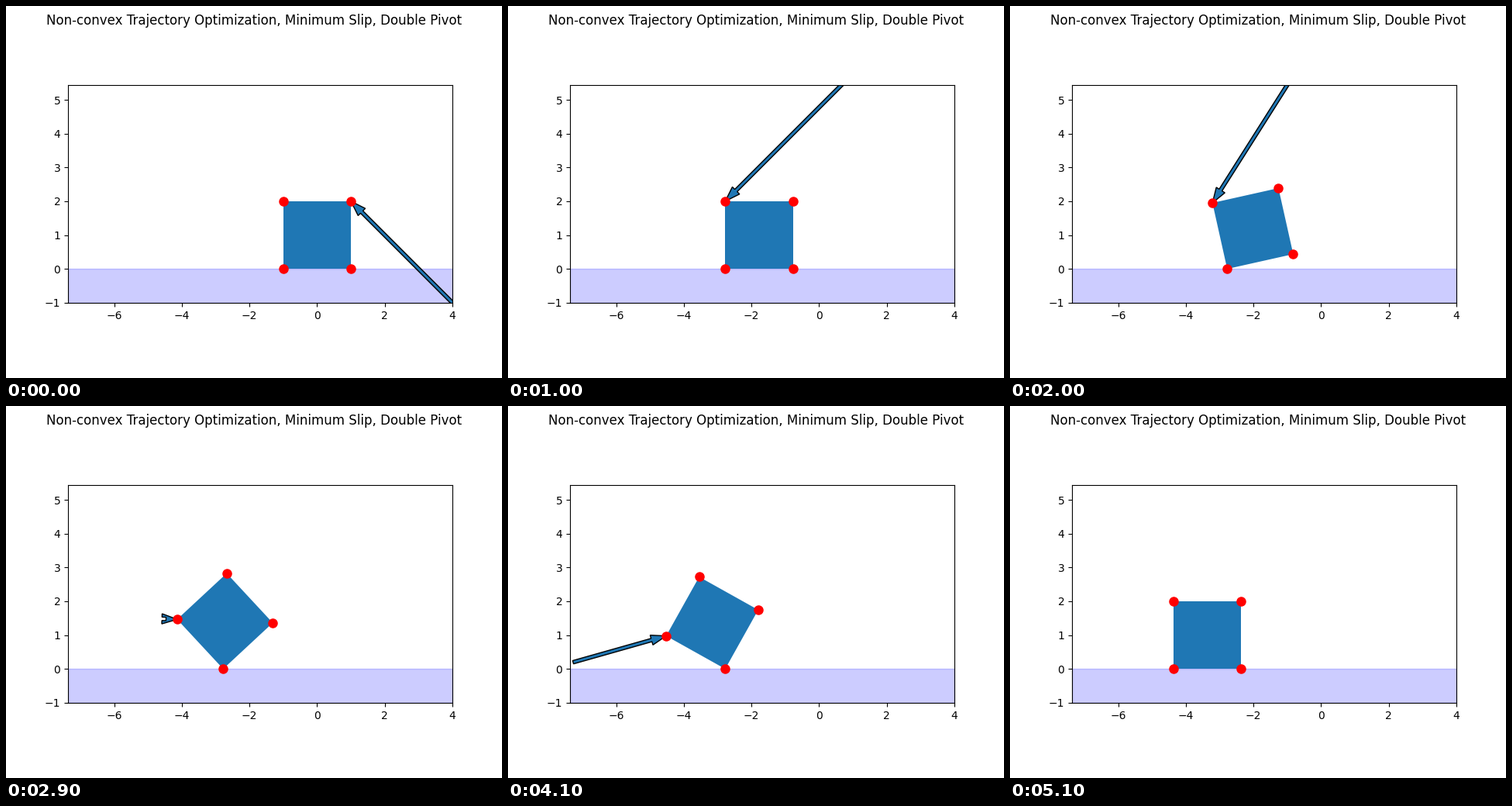
A matplotlib script for the animation above (6200 ms loop, 640x480 px).

```python
import numpy as np
import matplotlib.pyplot as plt
from matplotlib.animation import FuncAnimation

FRAMES, INTERVAL = 62, 100
FLIP, LAST = 9, 50                          # steps at which the two flips end
START, MIDDLE, END = -1.0, -2.777, -2.366   # pivot positions on the ground
SIDE = 2.0
SQUARE = SIDE * np.array([[0, 0], [1, 0], [1, 1], [0, 1]])

# Key points of the second, balanced flip: step, angle, signed push
KEYS = np.array([
    (9, 0, 10.7),
    (19, 12.6, 4.9),
    (28, 42.9, -0.33),
    (40, 60.8, -2.86),
    (46, 70.4, -3.2),
    (49, 78.8, 0),
])


def smooth(t, xs, ys):
    """Cubic curve through the key points, starting from rest."""
    slopes = np.gradient(ys, xs)
    slopes[0] = 0
    i = np.clip(np.searchsorted(xs, t, side="right") - 1, 0, len(xs) - 2)
    h = xs[i + 1] - xs[i]
    u = (t - xs[i]) / h
    ease = u * u * (3 - 2 * u)
    return (ys[i] + (ys[i + 1] - ys[i]) * ease
            + h * u * (1 - u) * (slopes[i] * (1 - u) - slopes[i + 1] * u))


def slide(start, end, u):
    # The pivot sticks until the box is about to land
    return start + (end - start) * u ** 24


def pose(step):
    """Return angle in degrees, pivot x, signed push and pushed corner."""
    if step < FLIP:
        angle = min(1.5 * step ** 2, 90)
        pivot = slide(START, MIDDLE + SIDE, step / FLIP)
        return angle, pivot, 10.5 - 1.9 * step, 2
    pivot = slide(MIDDLE, END, (step - FLIP) / (LAST - FLIP))
    if step == LAST:
        return 90, pivot, 0, 3
    steps, angles, pushes = KEYS.T
    return smooth(step, steps, angles), pivot, np.interp(step, steps, pushes), 3


def box_corners(angle, pivot):
    a = np.radians(angle)
    turn = np.array([[np.cos(a), -np.sin(a)], [np.sin(a), np.cos(a)]])
    return SQUARE @ turn.T + [pivot, 0]


def push_vector(angle, push, corner):
    # The push lies on one edge of the friction cone, which turns with the box
    normal = angle + (180 if corner == 2 else 270)
    a = np.radians(normal - 45 * np.sign(push))
    return abs(push) * np.array([np.cos(a), np.sin(a)])


fig = plt.figure(figsize=(6.4, 4.8), dpi=100)
ax = fig.add_subplot()
fig.suptitle("Non-convex Trajectory Optimization, Minimum Slip, Double Pivot")
ax.set_aspect("equal")
ax.set_xlim(-7.366, 4)
ax.set_ylim(-1, 5.438)
ax.set_xticks(range(-6, 5, 2))
ax.set_yticks(range(-1, 6))

ax.axhspan(-1, 0, color="b", alpha=0.2)
box = ax.add_patch(plt.Polygon(SQUARE, facecolor="C0", edgecolor="none"))
arrow = ax.arrow(0, 0, 1, 1, width=0.1, length_includes_head=True,
                 facecolor="C0", edgecolor="black")
dots, = ax.plot([], [], "o", color="red", markersize=8)


def draw(frame):
    step = min(max(frame - 1, 0), LAST)
    angle, pivot, push, corner = pose(step)
    points = box_corners(angle, pivot)
    box.set_xy(points)
    dots.set_data(points[:, 0], points[:, 1])
    arrow.set_visible(push != 0)
    if push:
        force = push_vector(angle, push, corner)
        tail = points[corner] - force
        arrow.set_data(x=tail[0], y=tail[1], dx=force[0], dy=force[1])
    return box, arrow, dots


anim = FuncAnimation(fig, draw, frames=FRAMES, interval=INTERVAL,
                     repeat=True, repeat_delay=0)
plt.show()
```
